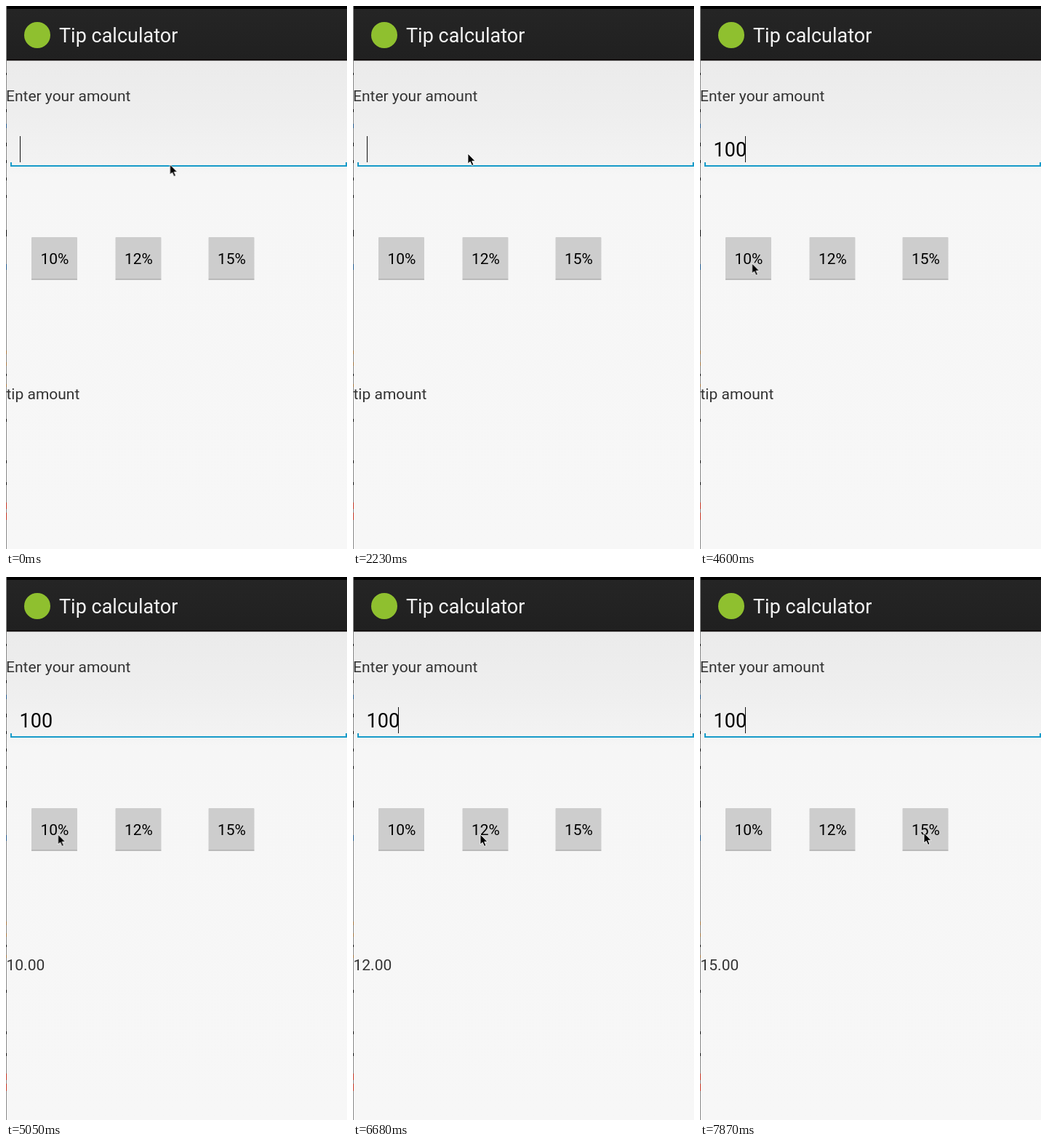
An HTML page for the animation above (8000 ms loop, 469 px wide and 747 px high).

```html
<!DOCTYPE html>
<html lang="en">
<head>
<meta charset="utf-8">
<title>Tip calculator</title>
<style>
html, body { margin: 0; width: 100%; height: 100%; overflow: hidden; background: #f7f7f7; }
svg { display: block; width: 469px; height: 747px; }
text { font: 21px Roboto, Arial, sans-serif; fill: #333; }
.title { font-size: 27px; fill: #f3f3f3; }
.amount { font-size: 27px; fill: #000; }
.button text { fill: #000; text-anchor: middle; }
.body { fill: #cdcdcd; }
.edge { fill: #a3a3a3; }
.halo { fill: #c9e7f2; }
.glow { fill: #99cfe4; }

/* All states change in hard steps on one shared 8 s clock */
#cursor, #caret, .key, .press, .result { animation: 8s step-end infinite; }

#cursor { animation-name: travel; }
@keyframes travel {
  0% { transform: translate(225.5px, 218px); }
  7.375% { transform: translate(213px, 216px); }
  9.25% { transform: translate(171px, 209px); }
  11.125% { transform: translate(160px, 205px); }
  13% { transform: translate(157px, 204px); }
  16.75% { transform: translate(158px, 204px); }
  27.875% { transform: translate(158px, 203px); }
  52% { transform: translate(152px, 215px); }
  53.875% { transform: translate(89px, 317px); }
  55.625% { transform: translate(73px, 350px); }
  57.5% { transform: translate(71.5px, 354px); }
  66.75% { transform: translate(85px, 354px); }
  68.625% { transform: translate(135px, 354px); }
  70.5% { transform: translate(175px, 354px); }
  87.25% { transform: translate(195px, 354px); }
  89.125% { transform: translate(240px, 354px); }
  91% { transform: translate(295px, 353px); }
  92.75%, 100% { transform: translate(308px, 352px); }
}

#caret { animation-name: blink, shift; }
@keyframes blink {
  0%, 13%, 24.125%, 37.125%, 57.5%, 70.5%, 81.625%, 96.5%, 100% { opacity: 1; }
  5.5%, 18.5%, 31.5%, 50.125%, 63.125%, 76.125%, 89.125% { opacity: 0; }
}
@keyframes shift {
  0% { transform: translateX(19px); }
  39% { transform: translateX(33px); }
  40.875% { transform: translateX(48px); }
  44.5%, 100% { transform: translateX(62px); }
}

.key { fill-opacity: 0; }
.k1 { animation-name: type1; }
.k2 { animation-name: type2; }
.k3 { animation-name: type3; }
@keyframes type1 { 0% { fill-opacity: 0; } 39%, 100% { fill-opacity: 1; } }
@keyframes type2 { 0% { fill-opacity: 0; } 40.875%, 100% { fill-opacity: 1; } }
@keyframes type3 { 0% { fill-opacity: 0; } 44.5%, 100% { fill-opacity: 1; } }

.press { opacity: 0; }
.p1 { animation-name: press1; }
.p2 { animation-name: press2; }
.p3 { animation-name: press3; }
@keyframes press1 { 0%, 63.125%, 100% { opacity: 0; } 61.25% { opacity: 1; } }
@keyframes press2 { 0%, 83.5%, 100% { opacity: 0; } 81.625% { opacity: 1; } }
@keyframes press3 { 0%, 98.375%, 100% { opacity: 0; } 96.5% { opacity: 1; } }

.r0 { animation-name: hint; }
.r1 { animation-name: tip10; }
.r2 { animation-name: tip12; }
.r3 { animation-name: tip15; }
@keyframes hint { 0% { opacity: 1; } 63.125%, 100% { opacity: 0; } }
@keyframes tip10 { 0%, 83.5%, 100% { opacity: 0; } 63.125% { opacity: 1; } }
@keyframes tip12 { 0%, 98.375%, 100% { opacity: 0; } 83.5% { opacity: 1; } }
@keyframes tip15 { 0% { opacity: 0; } 98.375%, 100% { opacity: 1; } }
</style>
</head>
<body>
<svg viewBox="0 0 469 747">
  <defs>
    <linearGradient id="page" x1="0" y1="75" x2="0" y2="747" gradientUnits="userSpaceOnUse">
      <stop offset="0" stop-color="#ebebeb"/>
      <stop offset=".11" stop-color="#eeeeee"/>
      <stop offset=".2" stop-color="#f2f2f2"/>
      <stop offset=".235" stop-color="#f6f6f6"/>
      <stop offset="1" stop-color="#f7f7f7"/>
    </linearGradient>
    <linearGradient id="bar" x1="0" y1="0" x2="0" y2="1">
      <stop offset="0" stop-color="#252525"/>
      <stop offset="1" stop-color="#202020"/>
    </linearGradient>
    <g id="face">
      <rect class="body" width="63" height="58" rx="1"/>
      <rect class="edge" y="57.5" width="63" height="1.2"/>
    </g>
    <g id="pressed">
      <rect class="halo" x="-6" y="-7" width="75" height="72" rx="3"/>
      <rect class="glow" width="63" height="58" rx="1"/>
    </g>
  </defs>

  <rect y="75" width="469" height="672" fill="url(#page)"/>
  <rect width="469" height="4" fill="#000"/>
  <rect y="4" width="469" height="70" fill="url(#bar)"/>
  <rect y="73" width="469" height="2" fill="#171313"/>
  <rect y="75" width="469" height="1" fill="#bdbdbd"/>

  <!-- Sliver of desktop along the left edge -->
  <path d="M.5 0V747" stroke="#8a8a8a"/>
  <path d="M.5 92v3M.5 142v4M.5 188v5M.5 212v4M.5 236v4M.5 260v4M.5 308v9M.5 506v3M.5 568v4M.5 625v4M.5 655v4" stroke="#111"/>
  <path d="M.5 162v6M.5 355v8" stroke="#2a5f92"/>
  <path d="M.5 474v5M.5 490v5M.5 520v4" stroke="#a97a45"/>
  <path d="M.5 683v9M.5 697v10" stroke="#c83a28"/>

  <circle cx="43" cy="40" r="18" fill="#8fc02f"/>
  <text class="title" x="73" y="50">Tip calculator</text>
  <text x="0" y="130.5">Enter your amount</text>

  <path d="M7 215V220H468V215" fill="none" stroke="#179bc9" stroke-width="2"/>
  <text class="amount" x="18.5" y="207"><tspan class="key k1">1</tspan><tspan class="key k2">0</tspan><tspan class="key k3">0</tspan></text>
  <rect id="caret" y="179" width="1" height="36" fill="#111"/>

  <g class="button" transform="translate(35 318)">
    <use href="#face"/><use class="press p1" href="#pressed"/>
    <text x="32" y="37">10%</text>
  </g>
  <g class="button" transform="translate(150.5 318)">
    <use href="#face"/><use class="press p2" href="#pressed"/>
    <text x="32" y="37">12%</text>
  </g>
  <g class="button" transform="translate(278.5 318)">
    <use href="#face"/><use class="press p3" href="#pressed"/>
    <text x="32" y="37">15%</text>
  </g>

  <text class="result r0" x="0.5" y="540.5">tip amount</text>
  <text class="result r1" x="0.5" y="540.5">10.00</text>
  <text class="result r2" x="0.5" y="540.5">12.00</text>
  <text class="result r3" x="0.5" y="540.5">15.00</text>

  <path id="cursor" d="M0 0V14L3.2 11.2 5.6 16.5 8 15.5 5.7 10.3H10Z" fill="#000" stroke="#fff" stroke-width=".9"/>
</svg>
</body>
</html>
```
